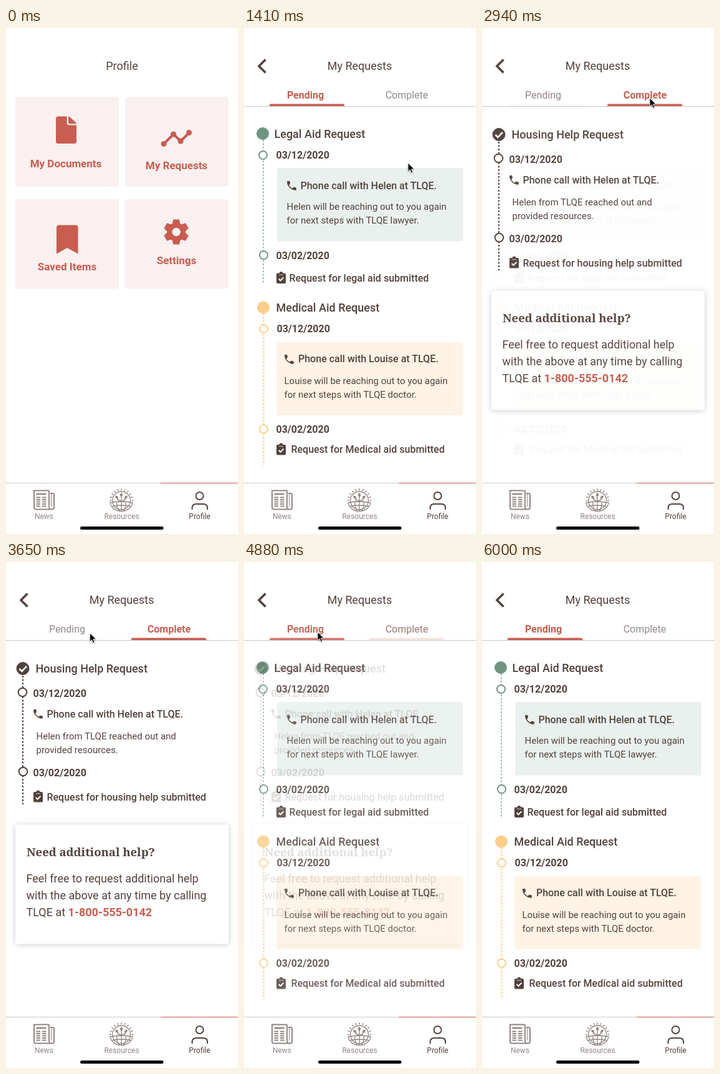
An HTML page that plays this animation: 372x810 px, repeating every 7590 ms.

```html
<!DOCTYPE html>
<html lang="en">
<head>
<meta charset="utf-8">
<title>My Requests</title>
<style>
  html, body { margin: 0; width: 100%; height: 100%; overflow: hidden; background: #fff; }
  svg { display: block; width: 372px; height: 810px; }
  text { font: 15px Roboto, sans-serif; fill: #52423d; }
  .title { font-size: 18px; text-anchor: middle; }
  .tile { font-size: 17px; font-weight: 700; fill: #c85d50; text-anchor: middle; }
  .tab { font-size: 16px; fill: #918a87; text-anchor: middle; }
  .on { font-weight: 700; fill: #c85d50; }
  .head { font-size: 18px; font-weight: 500; }
  .date { font-size: 16px; font-weight: 700; }
  .item { font-size: 16px; font-weight: 500; }
  .big { font-size: 18px; }
  .serif { font: 700 18.5px "Noto Serif", serif; }
  .nav { font-size: 12px; text-anchor: middle; fill: #918683; }
  .dark { fill: #52423d; }
  .red { fill: #c85d50; }
  .pale { fill: #f9f0ef; }
  .line { fill: none; stroke-width: 2; }
  .dots { fill: none; stroke-width: 2; stroke-dasharray: 3 2.5; }
  .ring { fill: #fff; stroke-width: 2; }
  .card { fill: #fff; filter: drop-shadow(0 1px 5px #0003); }
  #cursor { filter: drop-shadow(0 1px 1px #0006); }
</style>
</head>
<body>
<svg viewBox="0 0 372 810">
  <defs>
    <path id="phone" class="dark" transform="scale(.82) translate(-3 -3)" d="M6.6 10.8c1.4 2.8 3.8 5.1 6.6 6.6l2.2-2.2c.3-.3.7-.4 1-.2 1.1.4 2.3.5 3.6.5.6 0 1 .5 1 1V20c0 .6-.4 1-1 1C10.600 21 3 13.400 3 4c0-.6.400-1 1-1h3.500c.6 0 1 .400 1 1 0 1.200.2 2.400.6 3.600.1.300 0 .700-.300 1z"/>
    <g id="clip">
      <rect class="dark" y="2.500" width="15" height="16.500" rx="2"/>
      <circle class="dark" cx="7.500" cy="2.800" r="2.800"/>
      <path d="M4 5.200h7" stroke="#fff" stroke-width=".7"/>
      <path d="M3.700 11.500l2.800 2.800 5-5.200" fill="none" stroke="#fff" stroke-width="2"/>
    </g>
    <g id="header">
      <rect width="372" height="728" fill="#fff"/>
      <path class="line" d="M34.500 50.500L24 61l10.500 10.500" stroke="#52423d" style="stroke-width:3.600"/>
      <text class="title" x="185.500" y="67">My Requests</text>
      <path d="M0 125.500h372" stroke="#c9c9c9"/>
    </g>
    <path id="bar" class="red" d="M0 125v-1.500q0-2 2-2h116q2 0 2 2v1.500z"/>
    <path id="tooth" d="M-4.200-20h8.400q.8 0 .9.800l1.400 7.200h-13l1.400-7.200q.1-.8.900-.8z"/>
  </defs>

  <g>
    <text class="title" x="186" y="67">Profile</text>
    <g class="pale">
      <rect x="15" y="110" width="166" height="144" rx="5"/>
      <rect x="191" y="110" width="166" height="144" rx="5"/>
      <rect x="15" y="274" width="166" height="143.500" rx="5"/>
      <rect x="190" y="274" width="167" height="143.500" rx="5"/>
    </g>
    <g class="red">
      <path d="M84 141.500h13.500v10q0 4 4 4h11.500v26q0 3.500-3.500 3.500h-26q-3.500 0-3.500-3.500v-36.500q0-3.500 4-3.500z"/>
      <path d="M100 141.500q1.200 0 2 .8l9.700 8.700q1.300 1.200 1.300 2.200h-11q-2 0-2-2z"/>
      <path d="M253 185.500l15.500-15.500 11.500 11 13.500-13" fill="none" stroke="#c85d50" stroke-width="4"/>
      <circle cx="253" cy="185.500" r="4.500"/><circle cx="268.500" cy="170" r="4.500"/>
      <circle cx="280" cy="181" r="4.500"/><circle cx="293.500" cy="167.500" r="4.500"/>
      <path d="M85 315.500h26.500q4 0 4 4v42l-17.500-9.500-17 9.500v-42q0-4 4-4z"/>
      <g transform="translate(273 326.500)">
        <circle r="14.800"/>
        <use href="#tooth"/>
        <use href="#tooth" transform="rotate(60)"/><use href="#tooth" transform="rotate(120)"/>
        <use href="#tooth" transform="rotate(180)"/><use href="#tooth" transform="rotate(240)"/>
        <use href="#tooth" transform="rotate(300)"/>
        <circle class="pale" r="6.800"/>
      </g>
    </g>
    <text class="tile" x="96" y="223">My Documents</text>
    <text class="tile" x="273.500" y="226">My Requests</text>
    <text class="tile" x="98" y="388">Saved Items</text>
    <text class="tile" x="273.500" y="378">Settings</text>
  </g>

  <g id="pending">
    <use href="#header"/>
    <use href="#bar" x="41"/>
    <text class="tab on" x="98.500" y="113">Pending</text>
    <text class="tab" x="261" y="113">Complete</text>

    <g stroke="#6f9582">
      <path class="dots" d="M31 179v231" stroke="#a5c0b4"/>
      <circle cx="30" cy="169" r="9.500" fill="#6f9582"/>
      <circle class="ring" cx="30.500" cy="203.500" r="6.500"/>
      <circle class="ring" cx="31.500" cy="363.500" r="6.500"/>
    </g>
    <text class="head" x="48.500" y="176">Legal Aid Request</text>
    <text class="date" x="51.500" y="209">03/12/2020</text>
    <rect x="53" y="224" width="298.500" height="117.500" rx="3" fill="#e9f0ee"/>
    <use href="#phone" x="84" y="299" transform="translate(-15 -54)"/>
    <text class="item" x="90.500" y="258">Phone call with Helen at TLQE.</text>
    <text x="68.500" y="291">Helen will be reaching out to you again</text>
    <text x="68.500" y="313">for next steps with TLQE lawyer.</text>
    <text class="date" x="51.500" y="370">03/02/2020</text>
    <use href="#clip" x="52" y="390"/>
    <text class="item" x="72.500" y="406">Request for legal aid submitted</text>

    <g stroke="#fdce8c">
      <path class="dots" d="M31.500 457v243"/>
      <circle cx="31" cy="447.500" r="9.500" fill="#fdce8c"/>
      <circle class="ring" cx="31.500" cy="481.500" r="6.500"/>
      <circle class="ring" cx="31.500" cy="642" r="6.500"/>
    </g>
    <text class="head" x="51.500" y="454">Medical Aid Request</text>
    <text class="date" x="52.500" y="487">03/12/2020</text>
    <rect x="52" y="503" width="299" height="117" rx="3" fill="#fef3e4"/>
    <use href="#phone" x="65" y="523"/>
    <text class="item" x="87" y="535">Phone call with Louise at TLQE.</text>
    <text x="64.500" y="570">Louise will be reaching out to you again</text>
    <text x="64.500" y="592">for next steps with TLQE doctor.</text>
    <text class="date" x="51.500" y="648">03/02/2020</text>
    <use href="#clip" x="52" y="664.500"/>
    <text class="item" x="75.500" y="680">Request for Medical aid submitted</text>
  </g>

  <g id="complete">
    <use href="#header"/>
    <use href="#bar" x="201"/>
    <text class="tab" x="98" y="113">Pending</text>
    <text class="tab on" x="261.500" y="113">Complete</text>

    <g stroke="#52423d">
      <path class="dots" d="M27 182v206"/>
      <circle class="dark" cx="27" cy="170.500" r="10"/>
      <path d="M21.500 171l4 4 7.500-8" fill="none" stroke="#fff" stroke-width="2.600"/>
      <circle class="ring" cx="26.500" cy="208.500" r="6.800"/>
      <circle class="ring" cx="27.500" cy="335.500" r="6.800"/>
    </g>
    <text class="head" x="47.500" y="177">Housing Help Request</text>
    <text class="date" x="43.500" y="216">03/12/2020</text>
    <use href="#phone" x="44" y="236"/>
    <text class="item" x="65.500" y="249">Phone call with Helen at TLQE.</text>
    <text x="48.500" y="284">Helen from TLQE reached out and</text>
    <text x="48.500" y="306">provided resources.</text>
    <text class="date" x="43.500" y="343">03/02/2020</text>
    <use href="#clip" x="44" y="365.500"/>
    <text class="item" x="65.500" y="382">Request for housing help submitted</text>

    <rect class="card" x="15" y="420.500" width="342" height="191" rx="4"/>
    <text class="serif" x="33" y="471">Need additional help?</text>
    <text class="big" x="32.500" y="513">Feel free to request additional help</text>
    <text class="big" x="32.500" y="540">with the above at any time by calling</text>
    <text class="big" x="32.500" y="567">TLQE at <tspan class="on">1-800-555-0142</tspan></text>
  </g>

  <g>
    <path d="M0 728.500h248" stroke="#c9c9c9"/>
    <path d="M248 728.500h124" stroke="#c85d50"/>
    <g class="line" stroke="#918683">
      <path d="M69 740.500H45v27q0 3 3 3h26q3 0 3-3V747q0-2-2-2h-4M69 740.500v25q0 5 3 5"/>
      <path d="M72.500 746v20" stroke-width="1"/>
      <path d="M48.500 746h16" stroke-width="2.500"/>
      <path d="M48.500 751.500h6.500m3 0h6.500m-16 3.500h6.500m3 0h6.500m-16 3.500h6.500m3 0h6.500m-16 3.500h6.500m3 0h6.500m-16 3.500h6.500m3 0h6.500" stroke-width="1.800"/>
    </g>
    <g class="line" stroke="#918683" style="stroke-width:1.300">
      <circle cx="185" cy="756.500" r="14.500"/>
      <path id="rays" stroke-width="1.500"/>
      <path d="M167 760q18-4 36 0c-1 7-8 13.500-18 13.500S168 767 167 760zM169 766q16-4 32 0M185 758v15.500M178 759q-1 9 4 14M192 759q1 9-4 14"/>
      <path d="M185 758v-10M185 757q-6 0-7-5M185 757q6 0 7-5"/>
      <path d="M185 743.500l2.500 4-2.500 4-2.500-4zM175 748.500l4.500 1 .5 4.500-4-1.500zM195 748.500l-4.500 1-.5 4.500 4-1.500z" fill="#918683" stroke="none"/>
    </g>
    <g class="line" stroke="#52423d">
      <circle cx="310.500" cy="749" r="6"/>
      <path d="M298.500 771v-2.500q0-6.500 6.500-6.500h11.500q6.500 0 6.500 6.500v2.500"/>
    </g>
    <text class="nav" x="61" y="786">News</text>
    <text class="nav" x="185.500" y="786">Resources</text>
    <text class="nav dark" x="310.500" y="786">Profile</text>
    <rect x="119" y="798" width="133.500" height="5" rx="2.500"/>
  </g>

  <path id="cursor" d="M0 0v13.800l3.200-3 2.200 5 2.300-1-2.200-4.900h4.400z" stroke="#fff" stroke-width=".9"/>
</svg>
<script>
const $ = id => document.getElementById(id);
const LOOP = 7590, TICKS = 129;

$('rays').setAttribute('d', Array.from({ length: 11 }, (_, i) => {
  const a = Math.PI * (1 + i / 10), at = r => `${185 + r * Math.cos(a)} ${756.5 + r * Math.sin(a)}`;
  return `M${at(16.2)}L${at(19.2)}`;
}).join(''));

const linear = u => u, smooth = u => u * u * (3 - 2 * u), easeOut = u => u * (2 - u);

// Pointer visits: first and last tick, easing, then stops as [tick, x, y]
const visits = [
  [6, 8, linear, [[6, 163, 793], [8, 303, 728]]],
  [12, 54, easeOut, [[12, 346, 325], [17, 263, 216]]],
  [33, 54, smooth, [[33, 263, 216], [45, 266, 113], [46, 266, 113], [47, 269, 112]]],
  [55, 93, smooth, [[55, 269, 112], [64, 115, 114], [78, 115, 114], [79, 118, 112]]],
  [94, 101, linear, [[94, 118, 112], [98, 97, 400], [101, 143, 796]]]
];

function pointer(n) {
  const visit = visits.findLast(v => n >= v[0]);
  if (!visit || n > visit[1]) return null;
  const [, , ease, stops] = visit;
  const i = stops.findLastIndex(s => n >= s[0]);
  const [t0, x0, y0] = stops[i], [t1, x1, y1] = stops[i + 1] || stops[i];
  const u = t1 > t0 ? ease((n - t0) / (t1 - t0)) : 0;
  return [x0 + (x1 - x0) * u, y0 + (y1 - y0) * u];
}

// Value of the latest [tick, value] step
const level = (n, steps) => (steps.findLast(s => n >= s[0]) || [0, 0])[1];

function draw(now) {
  const n = Math.floor(((now + 6) % LOOP) * TICKS / LOOP);
  $('pending').style.opacity = level(n, [[22, .6], [24, 1]]);
  $('complete').style.opacity = level(n, [[50, .96], [56, 1], [82, .5], [83, .16], [84, 0]]);
  const p = pointer(n);
  $('cursor').style.display = p ? '' : 'none';
  if (p) $('cursor').setAttribute('transform', `translate(${p})`);
}

const start = performance.now();
function loop() {
  draw(performance.now() - start);
  requestAnimationFrame(loop);
}
loop();
</script>
</body>
</html>
```
